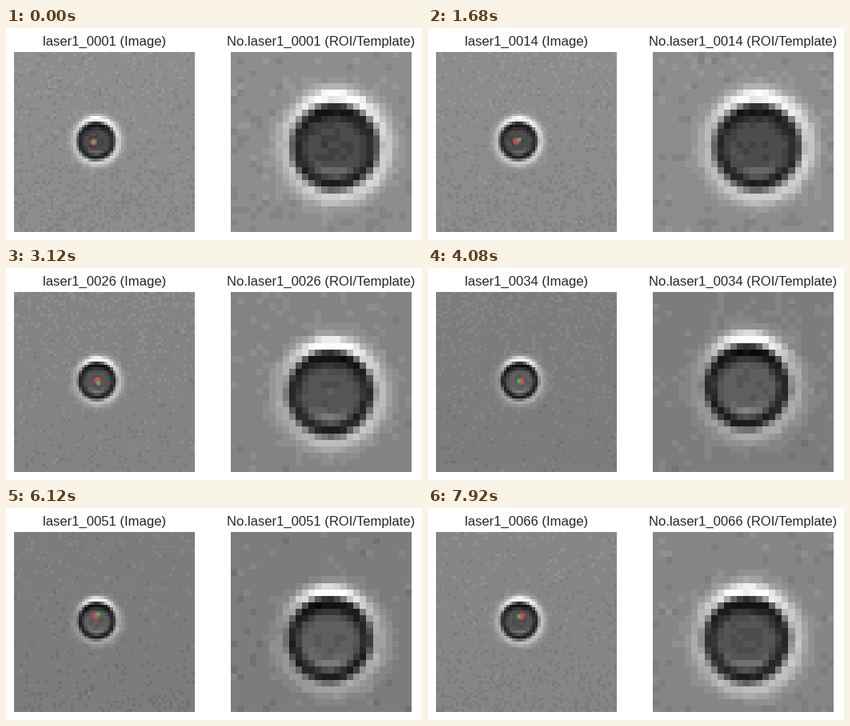
Write a matplotlib script that moves like this. It is 520 px wide and 265 px high and loops after 8 s.

```python
import numpy as np
import matplotlib.pyplot as plt
from matplotlib.animation import FuncAnimation

W, H, DPI = 520, 265, 100
SIDE = 225.45                 # axes size in pixels
N, ROI = 64, 28               # cells per side: whole image, cropped region
INTERVAL, FRAMES, STEPS_PER_SHOT = 40, 200, 3
RED, GREEN, INK = "#c44e52", "#55a868", "#262626"
GREY_STEP = 9.5

# Waypoints of the tracked point: shot, x, y
PATH = np.array([[1, 27.7, 31.5], [8, 29.7, 31.5], [19, 28.3, 30.7], [34, 29.7, 31.0],
                 [45, 28.1, 30.9], [57, 30.6, 29.3], [66, 29.6, 29.4]])

yy, xx = np.mgrid[0:N, 0:N] + 0.5


def bell(d, width):
    return np.exp(-(d / width) ** 2)


def defocus(shot):
    """The bead drifts out of focus three times, most strongly at the second."""
    return (0.2 + 0.3 * bell(shot - 1, 5) + 0.55 * bell(shot - 19, 6)
            + 0.18 * bell(shot - 66, 6))


def bead(cx, cy, blur, base):
    """Grey inside the bead, light added around it, and the outside mask."""
    dx, dy = xx - cx, yy - cy
    r = np.hypot(dx, dy) + 1e-6
    top, low, right = np.clip(-dy / r, 0, 1), np.clip(dy / r, 0, 1), dx / r
    edge = r - (6.55 + 0.5 * blur)

    ring = 0.75 * blur
    glow = ring + (1 - ring) * top ** 2.5 + 0.07 * right + 0.1 * low
    skirt = 0.2 * blur + 0.06 + 0.04 * right
    light = (255 - base) * (glow * bell(edge - 0.9, 0.95 + 0.7 * blur)
                            + skirt * bell(edge - 1.8, 1.8))

    inner = 110 - 70 * blur
    rim = 32 + 20 * blur - 26 * top ** 2 - 8 * low
    core = inner + (rim - inner) * bell(edge + 0.9, 1.05 + 0.5 * top)
    core += 350 * blur * max(0, 0.72 - blur) * low ** 4 * bell(edge + 2.7, 0.7)
    core -= 6 * bell(r - 1.5, 0.9)

    outside = np.clip(edge / (1 + blur) + 0.5, 0, 1)
    return core, light, outside


def shot_state(shot):
    rng = np.random.default_rng(100 + shot)
    loose = min(1, np.abs(PATH[:, 0] - shot).min())
    red = np.array([np.interp(shot, PATH[:, 0], PATH[:, k]) for k in (1, 2)])
    red += loose * np.round(rng.normal(0, 0.7, 2))
    lag = min(1, shot - 1) * 1.1 * np.tanh(3 * (29.1 - red[0]))
    green = red + [lag, loose * rng.normal(0, 0.5)]

    blur = defocus(shot)
    base = 112 + 58 * blur
    core, light, outside = bead(29.4 + 0.25 * (red[0] - 28.9), 31.8, blur, base)

    # Coarse grey levels, slightly darker towards the bottom
    tilt = 0.24 - 0.48 * yy / N - 0.14 * np.cos(2 * np.pi * (shot - 5.5) / 56)
    noise = rng.normal(0, 0.24 + 0.42 * blur ** 2, (N, N))
    field = base + GREY_STEP * np.round(tilt + noise + light / GREY_STEP)
    grain = GREY_STEP * np.round(core / GREY_STEP + noise)
    img = np.clip(outside * field + (1 - outside) * grain, 0, 255)

    x0, y0 = np.floor(red).astype(int) - ROI // 2
    return img, img[y0:y0 + ROI, x0:x0 + ROI], red, green


def panel(left, cells):
    ax = fig.add_axes([left / W, 10 / H, SIDE / W, SIDE / H])
    ax.axis("off")
    picture = ax.imshow(np.zeros((cells, cells)), cmap="gray", vmin=0, vmax=255,
                        interpolation="nearest", aspect="auto")
    return ax, picture, ax.set_title("", fontsize=12, color=INK, pad=5.3)


plt.rcParams["font.family"] = "Liberation Sans"
fig = plt.figure(figsize=(W / DPI, H / DPI), dpi=DPI, facecolor="white")
ax, whole, whole_title = panel(10, N)
_, crop, crop_title = panel(280.55, ROI)
red_dot, = ax.plot([], [], "o", color=RED, ms=6.2, mew=0)
link, = ax.plot([], [], color=GREEN, lw=2.4, solid_capstyle="round")
green_dot, = ax.plot([], [], "o", color=GREEN, ms=3.6, mew=0)
ax.set(xlim=(-0.5, N - 0.5), ylim=(N - 0.5, -0.5))

shots = {s: shot_state(s) for s in range(1, (FRAMES - 1) // STEPS_PER_SHOT + 1)}


def draw(frame):
    shot = max(1, frame // STEPS_PER_SHOT)
    img, roi, red, green = shots[shot]
    whole.set_data(img)
    crop.set_data(roi)
    middle = (red + green) / 2
    red_dot.set_data([red[0]], [red[1]])
    green_dot.set_data([green[0]], [green[1]])
    link.set_data([green[0], middle[0]], [green[1], middle[1]])
    whole_title.set_text(f"laser1_{shot:04d} (Image)")
    crop_title.set_text(f"No.laser1_{shot:04d} (ROI/Template)")
    return whole, crop, red_dot, link, green_dot, whole_title, crop_title


anim = FuncAnimation(fig, draw, frames=FRAMES, interval=INTERVAL,
                     repeat=True, repeat_delay=0, blit=False)
plt.show()
```
